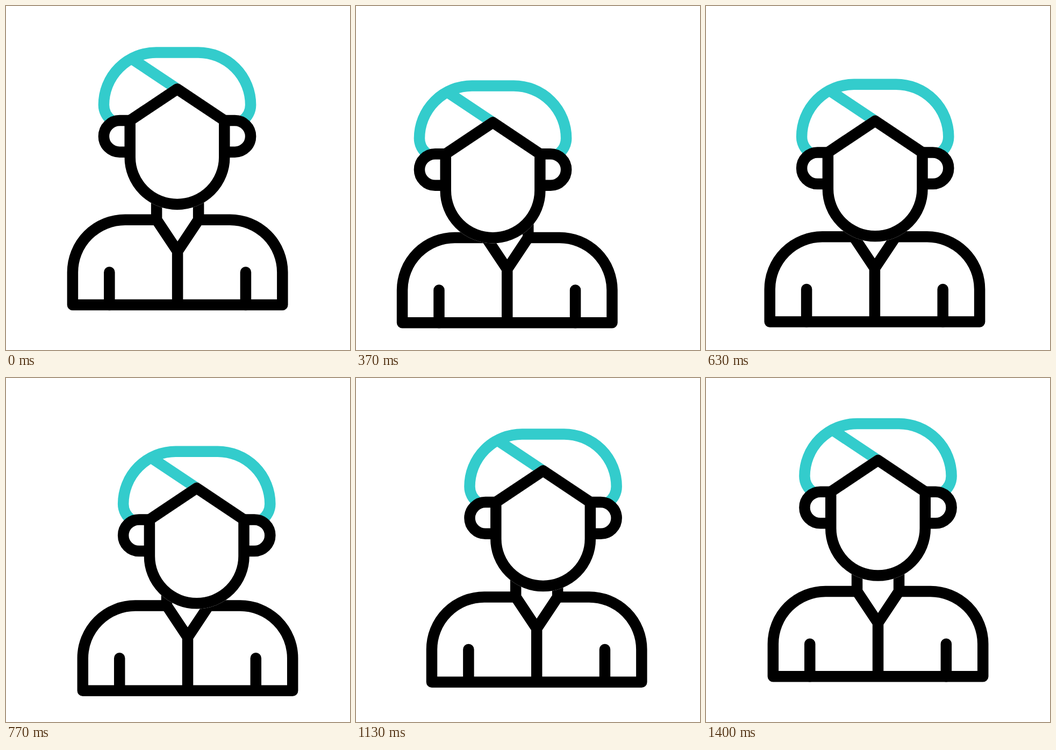
These frames come from a looping animation (640 by 640 pixels, 1.67 s). An HTML page:

```html
<!DOCTYPE html>
<html lang="en">
<head>
<meta charset="utf-8">
<title>Person icon</title>
<style>
  html, body { margin: 0; width: 100%; height: 100%; overflow: hidden; background: #fff; }
  svg { display: block; width: 100vw; height: 100vh; }
  g { fill: none; stroke: #000; stroke-width: 20.5; stroke-linejoin: round; }
  .wrap { stroke: #33cccc; }
  .knock { fill: #fff; stroke: #fff; }
  .arm { stroke-linecap: round; }
</style>
</head>
<body>
<svg viewBox="0 0 640 640">
  <g id="body">
    <path d="M281 397H222.4A97.6 97.6 0 0 0 124.8 494.6V555.2H515.2V494.6A97.6 97.6 0 0 0 417.6 397H359"/>
    <path d="M281 350V397L320 455.6L359 397V350M320 455.6V555.2"/>
    <path class="arm" d="M193.2 494.6V555.2M446.8 494.6V555.2"/>
  </g>
  <g id="head">
    <path class="wrap" d="M198.8 212.1A36 36 0 0 1 183.4 182.6A97.6 97.6 0 0 1 281 85H359A97.6 97.6 0 0 1 456.6 182.6A36 36 0 0 1 441.2 212.1M236 97L320 153"/>
    <path class="knock" d="M232.2 211.7V279.8A87.8 87.8 0 0 0 407.8 279.8V211.7L320 153Z"/>
    <path d="M232.2 211.7V279.8A87.8 87.8 0 0 0 407.8 279.8V211.7L320 153Z"/>
    <path d="M232.2 211.7H212.7A29.3 29.3 0 0 0 212.7 270.3H232.2M407.8 211.7H427.3A29.3 29.3 0 0 1 427.3 270.3H407.8"/>
  </g>
</svg>
<script>
  const LOOP = 1670, LAST_STEP = 42, FPS = 30;

  // Each key: time in ms, x and y offset from rest.
  const parts = [
    makePart('body', [[-38, 0, 0], [396, -38.4, 34.6], [873, 25.6, 23.2], [1410, 0, 0]]),
    makePart('head', [[-36, 0, 0], [373, -65.4, 63.6], [880, 48.2, 45.6], [1378, 0, 0]])
  ];

  // Joins the keys with smooth curves, tangents taken from the neighbours.
  function makePart(id, keys) {
    const tangent = (i, axis) => {
      const a = keys[Math.max(i - 1, 0)], b = keys[Math.min(i + 1, keys.length - 1)];
      return (b[axis] - a[axis]) / 6;
    };
    const legs = keys.slice(1).map((to, i) => {
      const from = keys[i];
      const handle = (key, n, sign) => [key[1] + sign * tangent(n, 1), key[2] + sign * tangent(n, 2)];
      const path = document.createElementNS('http://www.w3.org/2000/svg', 'path');
      path.setAttribute('d', `M${from[1]} ${from[2]}C${handle(from, i, 1)} ${handle(to, i + 1, -1)} ${to[1]} ${to[2]}`);
      return { start: from[0], end: to[0], path, length: path.getTotalLength() };
    });
    return { el: document.getElementById(id), legs };
  }

  const ease = u => u * u * (3 - 2 * u);

  function place({ el, legs }, time) {
    const leg = legs.find(l => time <= l.end) || legs[legs.length - 1];
    const u = Math.min((time - leg.start) / (leg.end - leg.start), 1);
    const p = leg.path.getPointAtLength(ease(u) * leg.length);
    el.setAttribute('transform', `translate(${p.x.toFixed(2)} ${p.y.toFixed(2)})`);
  }

  function draw(ms) {
    // Motion advances at 30 steps a second, on a 10 ms clock, then rests.
    const ticks = Math.floor((ms % LOOP) / 10);
    const step = Math.min(Math.floor((ticks * 3 + 1) / 10), LAST_STEP);
    for (const part of parts) place(part, step * 1000 / FPS);
  }

  const began = performance.now();
  function tick() {
    draw(performance.now() - began);
    requestAnimationFrame(tick);
  }
  tick();
</script>
</body>
</html>
```
